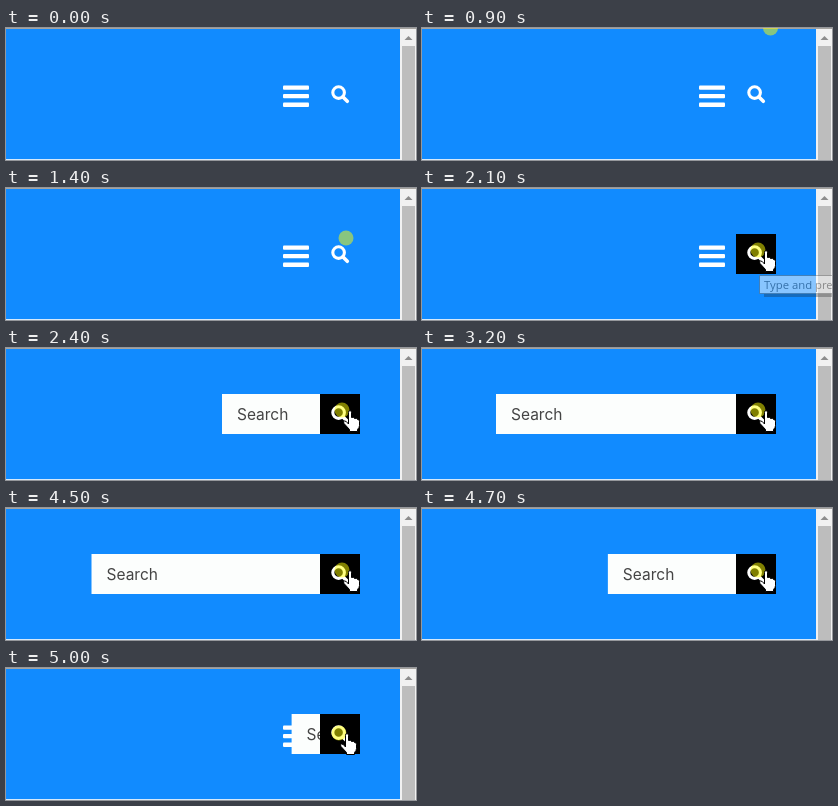
Write an HTML page that moves like this. It is 410 by 132 pixels and loops after 5.1 s.

```html
<!DOCTYPE html>
<html lang="en">
<head>
<meta charset="utf-8">
<title>Expanding search box</title>
<style>
html, body { margin: 0; width: 100%; height: 100%; overflow: hidden; background: #118bff; }
svg { display: block; }
.label { font: 15.5px Inter, sans-serif; fill: #444; }
.tip { font: 11.3px "Open Sans", sans-serif; fill: #575757; }
</style>
</head>
<body>
<svg width="410" height="132" viewBox="0 0 410 132">
  <defs>
    <clipPath id="clip"><rect id="clipBox" x="74" y="46" width="240" height="40"/></clipPath>
  </defs>
  <rect width="410" height="132" fill="#118bff"/>
  <rect y="131" width="394" height="1" fill="#d5e9fb"/>

  <g fill="#fff">
    <rect x="277" y="57.4" width="26" height="4.3" rx="1"/>
    <rect x="277" y="66" width="26" height="4.3" rx="1"/>
    <rect x="277" y="74.6" width="26" height="4.3" rx="1"/>
  </g>

  <g clip-path="url(#clip)">
    <rect x="74" y="46" width="240" height="40" fill="#fcfefd"/>
    <text id="label" class="label" y="71.7">Search</text>
  </g>

  <rect id="button" x="314" y="46" width="40" height="40"/>
  <g fill="none" stroke="#fff">
    <circle cx="332.6" cy="64.6" r="5.8" stroke-width="3.1"/>
    <path d="M337 69l4.3 4.3" stroke-width="3.6" stroke-linecap="round"/>
  </g>

  <g>
    <rect x="394" width="16" height="132" fill="#f1f1f1"/>
    <rect x="396" y="18" width="13" height="114" fill="#bdbdbd"/>
    <path d="M398.5 12l4-4 4 4z" fill="#8c8c8c"/>
  </g>
  <rect width="410" height="1" fill="#a5a39f"/>

  <g id="tip">
    <rect x="342" y="92" width="150" height="17" fill="#222" opacity=".6"/>
    <rect x="337.5" y="87.5" width="150" height="18" fill="#fff" stroke="#767676"/>
    <text class="tip" x="342" y="100.5">Type and press enter</text>
  </g>

  <circle id="glow" r="7.5" fill="#ff0" fill-opacity=".5"/>
  <path id="hand" fill="#fff" stroke="#000" stroke-width="1" stroke-linejoin="round"
    d="M5.5 14V2.5Q5.5.5 7 .5T8.500 2.500V7.500Q11 6.500 11.500 8.500Q14 7.500 14.500 9.500Q16.500 9 16.500 11.500V15.500Q16.500 17.500 14.500 19.500V21.500H6.500V19.500L1 13.500Q-.2 11.500 1.500 11Q3 10.500 5.500 14z"/>
</svg>
<script>
const LOOP = 5100, STEP = 100, FULL = 240, EDGE = 314;
const el = id => document.getElementById(id);
const clamp = v => Math.min(1, Math.max(0, v));

// The CSS "ease" curve: cubic-bezier(.25, .1, .25, 1)
function ease(x) {
  x = clamp(x);
  const bez = (a, b, s) => 3 * a * s * (1 - s) ** 2 + 3 * b * s * s * (1 - s) + s ** 3;
  let lo = 0, hi = 1;
  for (let i = 0; i < 24; i++) {
    const mid = (lo + hi) / 2;
    if (bez(.25, .25, mid) < x) lo = mid; else hi = mid;
  }
  return bez(.1, 1, lo);
}

// Keys are [time, value, value, ...]
function track(keys, t) {
  let i = 0;
  while (i < keys.length - 2 && t >= keys[i + 1][0]) i++;
  const a = keys[i], b = keys[i + 1];
  const p = clamp((t - a[0]) / (b[0] - a[0]));
  return a.slice(1).map((v, k) => v + (b[k + 1] - v) * p);
}

const pointer = [
  [900, 348.5, 0], [1000, 348.5, 2.5], [1100, 348.5, 2.5], [1200, 347, 10],
  [1300, 344, 28], [1400, 340, 50], [1500, 337, 60], [1600, 336, 62],
  [4700, 336, 62], [5000, 333, 65]
];
const tipFade = [[1800, 0], [1900, .17], [2100, .5], [2200, .25], [2300, 0]];

const show = (id, on) => el(id).setAttribute("visibility", on ? "visible" : "hidden");

function draw(t) {
  const open = ease((t - 2150) / 1000) - ease((t - 4439) / 943);
  const left = EDGE - FULL * open;
  el("clipBox").setAttribute("x", left);
  el("clipBox").setAttribute("width", EDGE - left);
  el("label").setAttribute("x", left + 15);

  const [x, y] = track(pointer, t);
  el("glow").setAttribute("transform", `translate(${x} ${y})`);
  el("hand").setAttribute("transform", `translate(${x + 1} ${y})`);
  show("glow", t >= 900);
  show("hand", t >= 1500);
  show("button", t >= 1500);
  el("tip").setAttribute("opacity", track(tipFade, t)[0]);
}

function tick() {
  draw(Math.floor(performance.now() % LOOP / STEP) * STEP);
  requestAnimationFrame(tick);
}
tick();
</script>
</body>
</html>
```
